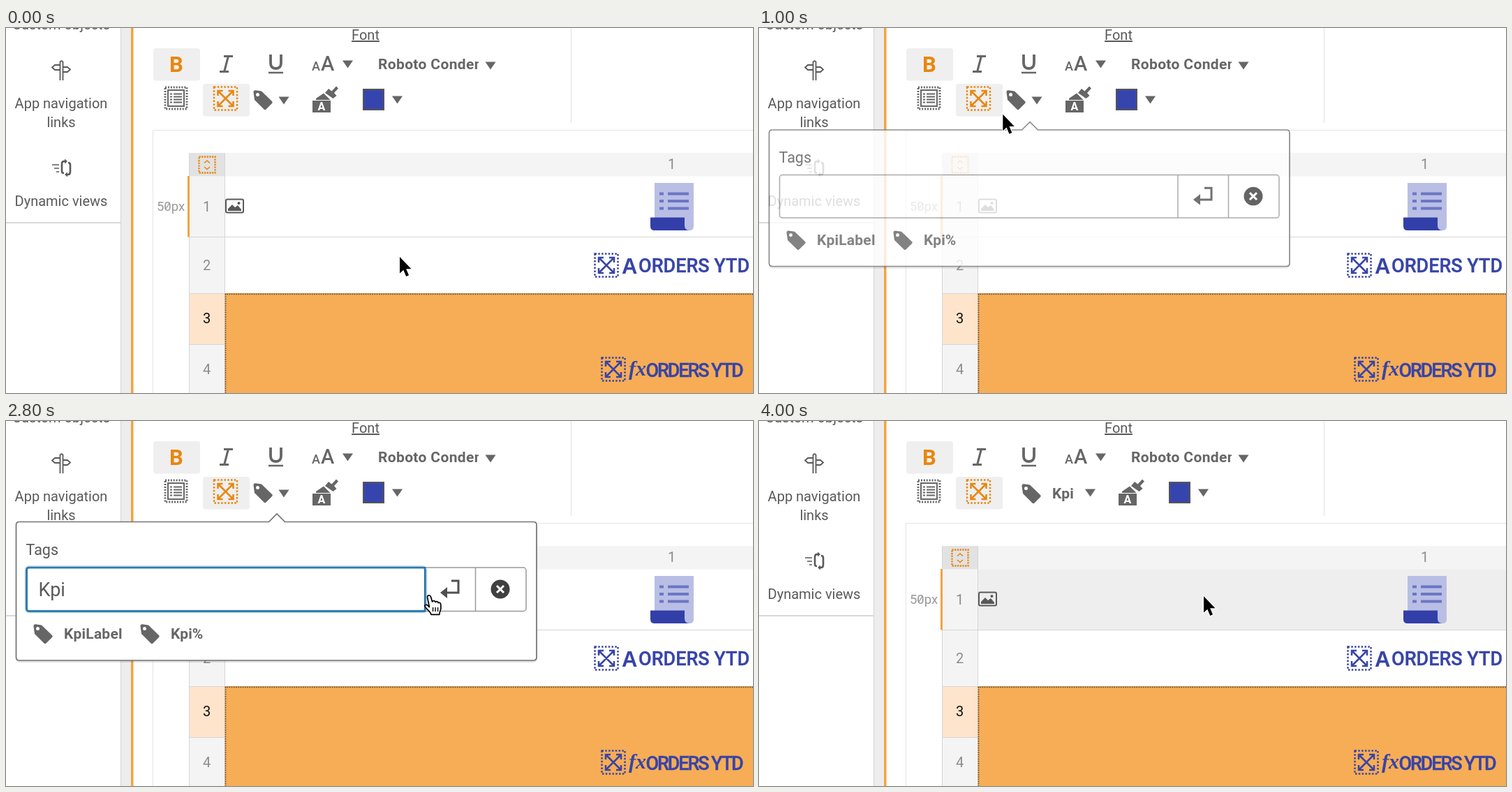
These frames come from a looping animation (1070x523 px, 4100 ms). An HTML page:

```html
<!DOCTYPE html>
<html lang="en">
<head>
<meta charset="utf-8">
<title>Tagging a row</title>
<style>
  html, body { margin: 0; width: 100%; height: 100%; overflow: hidden; background: #fff; }
  svg { display: block; width: 1070px; height: 523px; font: 20px Roboto, sans-serif; color: #595959; fill: #595959; }
  .line { fill: none; stroke: currentColor; }
  .mid { text-anchor: middle; }
  .bold { font-weight: 700; font-size: 21px; fill: #666; }
  .tool { color: #666; fill: #666; }
  .orange { color: #e8870f; fill: #e8870f; }
  .blue { color: #3744a8; fill: #3744a8; }
  .num { fill: #8c8c8c; text-anchor: middle; }
</style>
</head>
<body>
<svg viewBox="0 0 1070 523">
  <defs>
    <g id="expand" class="line" stroke-width="2.5">
      <rect x="-16.5" y="-16.5" width="33" height="33" stroke-dasharray="2.5 2.3"/>
      <path d="M-10-10L10 10M10-10L-10 10M-11-4V-11H-4M4-11H11V-4M11 4V11H4M-4 11H-11V4"/>
    </g>
    <g id="tag">
      <path d="M-13.5-11Q-13.5-14-10.5-13.7L-2-12.5L13 2Q14.5 3.5 13 5L4.5 13.5Q3 15 1.5 13.5L-12 0Z"/>
      <circle cx="-7.5" cy="-7.5" r="2.5" fill="#fff"/>
    </g>
    <path id="tri" d="M-7.5-5.5h15L0 5.5z"/>
    <path id="beamShape" d="M-5.5-13Q0-13 0-9V9Q0 13-5.5 13M5.5-13Q0-13 0-9M0 9Q0 13 5.5 13M-3.5 4H3.5"/>
    <clipPath id="fontClip"><rect x="530" y="35" width="147" height="35"/></clipPath>
  </defs>

  <!-- side panel -->
  <g class="mid">
    <text x="79" y="2">Custom objects</text>
    <text x="79" y="115">App navigation</text>
    <text x="79" y="141.5">links</text>
    <text x="79" y="255">Dynamic views</text>
  </g>
  <path class="line" stroke-width="1.8" d="M77.5 75V48.5Q79.5 46 81.5 48.5V75M77 53H70l-4 3.5 4 3.5H77M82 56H88l4 3.5-4 3.5H82"/>
  <g class="line" stroke-width="1.7">
    <path d="M66 196h10M69 201h7M72 206h4"/>
    <path stroke-width="2.6" d="M86 191H83Q80 191 80 195V205Q80 208 83 208M86 210H89Q92 210 92 206V196Q92 193 89 193"/>
    <path d="M84 187.5l4 3.5-4 3.5zM88 206.5l-4 3.5 4 3.5z" fill="#595959" stroke="none"/>
  </g>
  <path d="M0 279H164" stroke="#ccc" stroke-width="1.5"/>
  <rect x="164" width="15" height="523" fill="#ededed"/>
  <path d="M164.5 0V523" stroke="#d4d4d4"/>
  <rect x="179" width="3.5" height="523" fill="#f4a340"/>

  <!-- toolbar -->
  <text class="mid" x="515" y="17" text-decoration="underline">Font</text>
  <path class="line" d="M809.5 0V136" color="#e2e2e2"/>
  <g fill="#efefef">
    <rect x="211" y="29" width="67" height="46.5" rx="4"/>
    <rect x="282" y="80" width="67" height="46.5" rx="4"/>
  </g>
  <text class="orange mid" x="244" y="63" font-size="31" font-weight="700">B</text>
  <use href="#expand" class="orange" x="314.5" y="101"/>
  <g class="tool">
    <path class="line" stroke-width="3" d="M312 40.5h13M306 62.5h13M318.5 40l-6 23"/>
    <path class="line" stroke-width="3.8" d="M379 38v12q0 8 7.500 8t7.500-8V38"/>
    <path class="line" stroke-width="2.5" d="M376 64h21"/>
    <text x="438" y="61" font-size="18" font-weight="500">A</text>
    <text x="451" y="61" font-size="29" font-weight="500">A</text>
    <use href="#tri" x="489.5" y="52"/>
    <text class="bold" x="533" y="59" letter-spacing=".35" clip-path="url(#fontClip)">Roboto Condensed</text>
    <use href="#tri" x="694" y="54"/>
    <g class="line" stroke-width="2">
      <rect x="228" y="85" width="31" height="31" stroke-width="3" stroke-dasharray="2 1.9"/>
      <rect x="232" y="89" width="23" height="23"/>
      <path d="M235 94.5h3M240 94.5h12M235 98.5h3M240 98.5h12M235 102.5h3M240 102.5h12M235 106.5h3M240 106.5h12"/>
    </g>
    <use id="tagTool" href="#tag"/>
    <text id="tagName" class="bold" x="420" y="111">Kpi</text>
    <use id="tagTri" href="#tri"/>
    <g id="painter">
      <path d="M439 104h26v17h-26zM444 101l11-7.5 9.5 9.5h-20.5zM457 93l5-6 4.5 3.5 6.5-7 3 3-6 6.5 3.5 4-5 4z"/>
      <text class="mid" x="452" y="118" font-size="16" font-weight="700" fill="#fff">A</text>
      <rect x="512" y="88" width="29" height="29" fill="#3645ad" stroke="#555" stroke-width="2"/>
      <use href="#tri" x="560.5" y="103"/>
    </g>
  </g>

  <!-- table -->
  <path class="line" d="M1070 146.5H210.5V523" color="#e4e4e4"/>
  <rect x="262" y="179" width="808" height="33.5" fill="#f4f4f4"/>
  <rect x="262" y="179" width="51" height="33.5" fill="#e2e2e2"/>
  <rect x="262" y="212.5" width="51" height="311" fill="#f4f4f4"/>
  <rect x="262" y="380" width="51" height="73" fill="#fee4ca"/>
  <rect id="rowHover" x="314" y="212.5" width="756" height="87" fill="#eee"/>
  <path class="line" d="M263 299.5H1070M263 380.5H313M263 453.5H313M262.5 179V523M313.5 179V523" color="#d6d6d6"/>
  <rect x="260" y="212" width="3" height="87.5" fill="#f4a340"/>
  <g class="line" color="#e8870f" stroke-width="1.6">
    <rect x="276.5" y="184.5" width="23" height="23" stroke-width="2.3" stroke-dasharray="2.3 1.4"/>
    <path d="M284 193.5l4-3.5 4 3.5M284 199l4 3.5 4-3.5"/>
  </g>
  <g class="num">
    <text x="953.5" y="202">1</text>
    <text x="287.5" y="262.5">1</text>
    <text x="287.5" y="347">2</text>
    <text x="287.5" y="423" fill="#111">3</text>
    <text x="287.5" y="495.5">4</text>
    <text x="236" y="261.5" font-size="18.5" fill="#999">50px</text>
  </g>
  <path d="M229 259l5-8" stroke="#999" stroke-width="1.3"/>
  <g class="line" stroke-width="2">
    <rect x="315" y="245.5" width="25" height="19" rx="2"/>
    <g fill="#595959" stroke="none">
      <path d="M318 262v-3l6-6 4 4 4-3 5 6v2z"/>
      <circle cx="333.5" cy="251" r="2"/>
    </g>
  </g>
  <path d="M929 222H985V284Q985 290 979 290H929Z" fill="#b9bfe4"/>
  <path d="M923 271.5H972V283Q972 290 979 290H929Q923 290 923 284Z" fill="#323fa8"/>
  <path d="M936 237.5h6M948 237.5h30M936 248h6M948 248h30M936 258.5h6M948 258.5h30" stroke="#6c76c6" stroke-width="4"/>

  <rect x="313.5" y="380" width="757" height="143" fill="#f7ad55"/>
  <path class="line" d="M1070 380.5H313.5" color="#d98b2f"/>
  <path class="line" d="M1070 381.5H314.5V523" color="#555" stroke-width="1.7" stroke-dasharray="1.7 1.5"/>
  <g class="blue">
    <use href="#expand" x="860" y="340"/>
    <text x="882" y="351.5" font-family="Liberation Sans, sans-serif" font-size="31" font-weight="700">A</text>
    <text x="906" y="350" font-size="27" font-weight="500" stroke="currentColor" stroke-width=".4">ORDERS YTD</text>
    <use href="#expand" x="870" y="489"/>
    <text x="892" y="498" font-family="Liberation Serif, serif" font-size="30" font-weight="700" font-style="italic">fx</text>
    <text x="916.5" y="500" font-size="27" font-weight="500" letter-spacing="-2.1" stroke="currentColor" stroke-width=".4">ORDERS YTD</text>
  </g>

  <!-- tag popup -->
  <g id="popup">
    <rect x="14" y="146" width="747" height="200" rx="6" fill="#000" opacity=".12"/>
    <path d="M19 144.5H376.5L388 133L399.5 144.5H755.5Q760 144.5 760 149V338.5Q760 343 755.5 343H19Q14.5 343 14.5 338.5V149Q14.5 144.5 19 144.5Z" fill="#fff" stroke="#737373" stroke-width="1.7"/>
    <text x="28.5" y="192" font-size="21.5">Tags</text>
    <g class="line" color="#999" stroke-width="1.5">
      <rect x="29.5" y="210" width="715.5" height="62.5" rx="4"/>
      <path d="M600 210v62.5M672.5 210v62.5"/>
    </g>
    <path id="inputHover" class="line" color="#404040" stroke-width="2" d="M600 210H33.5Q29.5 210 29.5 214V268.5Q29.5 272.5 33.5 272.5H600Z"/>
    <g id="inputFocus" class="line" color="#2a7ab0">
      <rect x="29" y="209.5" width="572" height="63.5" rx="4" stroke-width="5" opacity=".25"/>
      <rect x="29.5" y="210" width="571" height="62.5" rx="3" stroke-width="2.5"/>
    </g>
    <rect id="buttonFocus" class="line" color="#2a72c8" x="600" y="210" width="73" height="62.5" stroke-width="3"/>
    <text id="typed" x="46.5" y="251" font-size="27"></text>
    <rect id="caret" y="225" width="1.7" height="34" fill="#333"/>
    <path class="line" color="#505050" stroke-width="3" d="M638 229H648V246H627"/>
    <path d="M632 238v16l-10-8z" fill="#505050"/>
    <circle cx="708" cy="241" r="13.5" fill="#404040"/>
    <path d="M703 236l10 10M713 236l-10 10" stroke="#fff" stroke-width="3"/>
    <g class="tool">
      <use href="#tag" x="53" y="305"/>
      <use href="#tag" x="206" y="305"/>
    </g>
    <text class="bold" x="83" y="312" letter-spacing=".2">KpiLabel</text>
    <text class="bold" x="236" y="312">Kpi%</text>
  </g>

  <!-- pointer shapes -->
  <g id="pointer">
    <path id="arrow" d="M0 0V23.5L5.3 18.7L9.2 28L13 26.3L9.2 17.2H16.5Z" fill="#000" stroke="#fff" stroke-width="2.4" paint-order="stroke"/>
    <g id="beam" fill="none">
      <use href="#beamShape" stroke="#fff" stroke-width="4"/>
      <use href="#beamShape" stroke="#000" stroke-width="2"/>
    </g>
    <g id="hand" fill="#fff" stroke="#000" stroke-width="1.7" stroke-linejoin="round">
      <path d="M-2.8 2.5C-4-1.5.8-2.6 2 1.2L4 8C4.5 6.2 8 6.2 8.5 8.6C9.5 7 12.3 7.4 12.6 9.8C14 8.6 16 9.8 16.2 12L16.4 17C16.4 20 14.4 21.5 14.2 26.5H2.5C1.5 22.5-3 20-6.2 15.2C-7.6 12.6-4.4 11.4-2.4 13.4L-.2 15.6Z"/>
      <path d="M5 16v6M8.5 16v6M12 16v6" stroke-width="1.4"/>
    </g>
  </g>
</svg>
<script>
const LOOP = 4100, STEP = 100;
const $ = id => document.getElementById(id);
const clamp = u => Math.min(1, Math.max(0, u));
const ease = u => u < .5 ? 4 * u ** 3 : 1 - 4 * (1 - u) ** 3;
const smooth = u => u * u * (3 - 2 * u);
const fade = (id, value) => $(id).setAttribute('opacity', value);
const show = (id, on) => fade(id, on ? 1 : 0);
const move = (id, x, y) => $(id).setAttribute('transform', `translate(${x} ${y})`);

// start, duration, destination
const moves = [[30, 600, 382, 90], [820, 480, 227, 250], [2300, 680, 637, 251]];
const keys = [[1900, 'K'], [2100, 'Kp'], [2200, 'Kpi']];

function pointerAt(t) {
  let x = 564, y = 328;
  for (const [start, duration, toX, toY] of moves) {
    const u = ease(clamp((t - start) / duration));
    x += (toX - x) * u;
    y += (toY - y) * u;
  }
  return [x, y];
}

function drawPointer(t) {
  const [x, y] = pointerAt(t);
  const inPopup = t >= 1000 && t < 3900;
  const hand = inPopup && x > 601;
  const beam = inPopup && !hand && y > 210;
  move('pointer', x, y);
  show('hand', hand);
  show('beam', beam);
  show('arrow', !hand && !beam);
  const passing = t < 700 && y > 212 && y < 299;
  fade('rowHover', passing ? 1 : clamp((t - 3800) / 200));
}

function drawToolbar(t) {
  const tagged = t >= 3400;
  move('tagTool', tagged ? 390 : 368, tagged ? 104 : 103);
  move('tagTri', tagged ? 474.5 : 398, tagged ? 103 : 104);
  move('painter', tagged ? 76 : 0, 0);
  show('tagName', tagged);
  const hovered = t >= 600 && t < 900;
  for (const id of ['tagTool', 'tagTri']) $(id).style.fill = hovered ? '#404040' : '#666';
}

function drawPopup(t) {
  const closing = t >= 3400;
  const opened = t < 700 ? 0 : smooth(clamp((t - 640) / 500));
  fade('popup', closing ? .25 * clamp((3600 - t) / 200) : opened);
  $('popup').setAttribute('transform', `translate(0 243.5) scale(1 ${.92 + .08 * opened}) translate(0 -243.5)`);

  fade('inputHover', closing ? 0 : clamp((t - 1200) / 200));
  fade('inputFocus', closing ? 0 : clamp((t - 1500) / 200));
  show('buttonFocus', closing);

  let [lastKey, text] = [1600, ''];
  for (const [time, value] of keys) if (t >= time) [lastKey, text] = [time, value];
  $('typed').textContent = text;
  show('caret', t >= 1600 && !closing && (t - lastKey) % 1000 < 500);
  $('caret').setAttribute('x', 47.5 + (text ? $('typed').getComputedTextLength() : 0));
}

const begin = performance.now();
function tick() {
  const elapsed = (performance.now() - begin + 20) % LOOP;
  const t = Math.floor(elapsed / STEP) * STEP;
  drawToolbar(t);
  drawPopup(t);
  drawPointer(t);
  requestAnimationFrame(tick);
}
tick();
</script>
</body>
</html>
```
